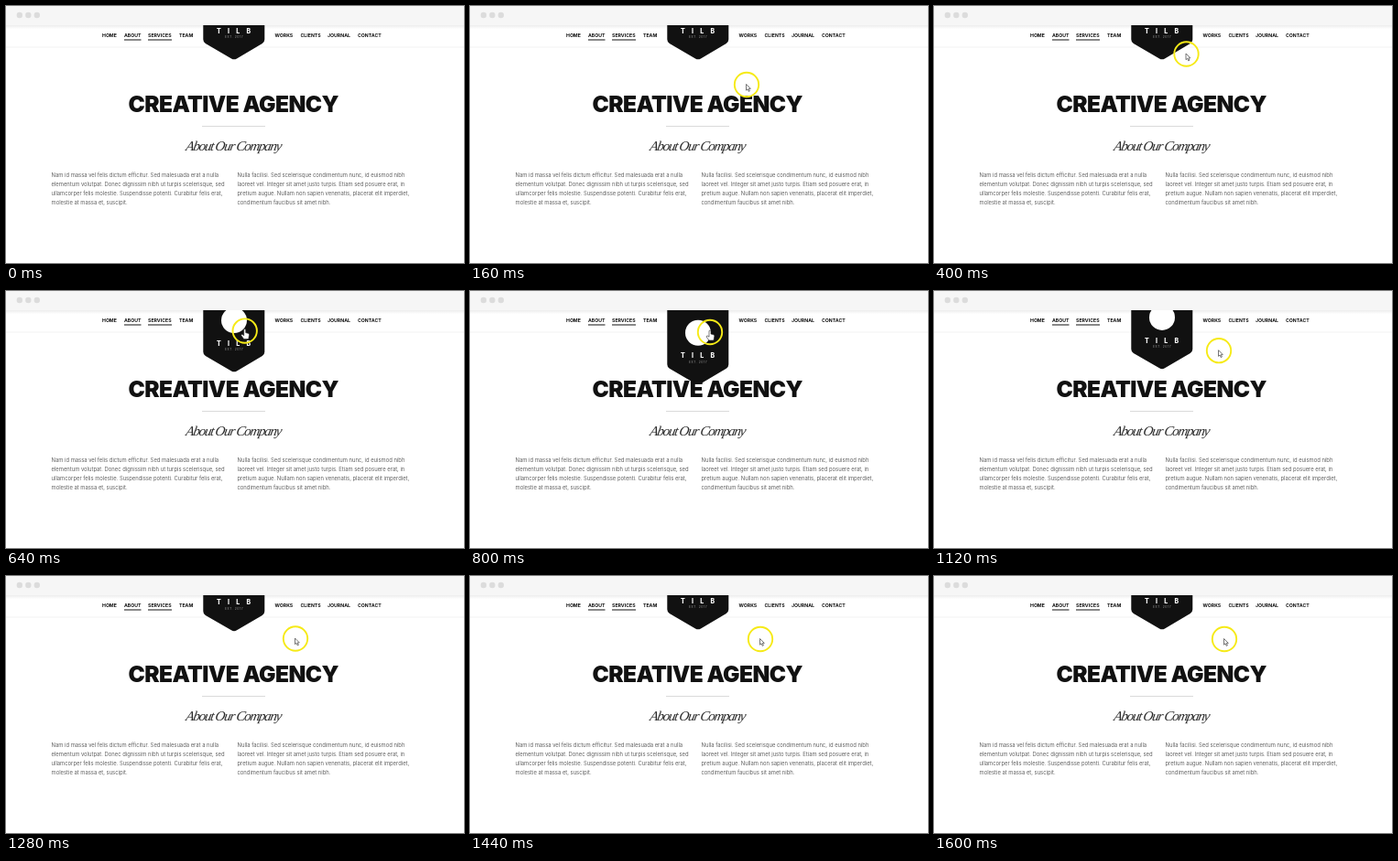
An HTML page for the animation above (1680 ms loop, 500 by 281 pixels).

```html
<!DOCTYPE html>
<html lang="en">
<head>
<meta charset="utf-8">
<title>Creative agency</title>
<style>
  html, body { margin: 0; height: 100%; overflow: hidden; background: #fff; }
  svg { display: block; width: 100vw; height: 100vh; }
  .nav { font: 700 5.2px Inter, sans-serif; fill: #111; }
  .title { font: 900 24.5px Inter, sans-serif; letter-spacing: -.6px; fill: #111; }
  .script { font: italic 15px "Liberation Serif", serif; letter-spacing: -1.25px; fill: #2a2a2a; }
  .copy { font: 5.86px Inter, sans-serif; fill: #606060; }
  .brand { font: 800 7px Inter, sans-serif; letter-spacing: 7.3px; fill: #fff; }
  .since { font: 3.2px Inter, sans-serif; letter-spacing: .6px; fill: #999; }
</style>
</head>
<body>
<svg viewBox="0 0 500 281">
  <defs>
    <linearGradient id="shade" x2="0" y2="1">
      <stop stop-color="#ededed"/><stop offset="1" stop-color="#fff"/>
    </linearGradient>
  </defs>
  <rect y="21" width="500" height="4" fill="url(#shade)"/>
  <path d="M0 45H500" stroke="#f3f3f3"/>
  <g id="nav" class="nav"></g>
  <path d="M129 37H147.5M155 37H181" stroke="#111"/>

  <text class="title" x="248.2" y="116.2" text-anchor="middle">CREATIVE AGENCY</text>
  <path d="M214 131.5H283" stroke="#dadada"/>
  <text class="script" text-anchor="middle" transform="translate(247.6 158) skewX(-10)">About Our Company</text>
  <g id="copy" class="copy"></g>

  <g id="banner">
    <path d="M215.3-60H282.3V36.5Q282.3 39.5 279.8 41L252 57.4Q249 59.2 246 57.4L217.8 41Q215.3 39.5 215.3 36.5Z" fill="#111"/>
    <circle cx="249" cy="2" r="14" fill="#fff"/>
    <text class="brand" x="230" y="29.6">TILB</text>
    <text class="since" x="239" y="35.2">EST. 2017</text>
  </g>

  <rect width="500" height="21" fill="#f6f6f6"/>
  <g fill="#dcdcdc">
    <circle cx="14.8" cy="10" r="3.2"/><circle cx="24.3" cy="10" r="3.2"/><circle cx="33.8" cy="10" r="3.2"/>
  </g>

  <g id="cursor">
    <circle r="13.2" fill="none" stroke="#f6ea17" stroke-width="1.9"/>
    <path id="arrow" d="M-.5-.5V6.2L1.1 4.8 2.2 7.4 3.4 6.9 2.3 4.4H4.3Z" fill="#fff" stroke="#555" stroke-width=".8"/>
    <path id="hand" d="M-1-1.5Q0-2.5 1-1.5V2L4 2.8Q5 3.2 4.8 4.5L4 9H-1L-4 5Q-3.6 3.5-2.3 4.2L-1 5.2Z" fill="#fff" stroke="#222" stroke-width=".6"/>
  </g>
</svg>
<script>
const LOOP = 1680, STEP = 80, DROP = 44, SLIDE = 320;
const OPEN_AT = 512, CLOSE_AT = 1043;
const el = id => document.getElementById(id);

const label = (x, y, text) => `<text x="${x}" y="${y}">${text}</text>`;

el('nav').innerHTML = [
  [105, 'HOME'], [129, 'ABOUT'], [155, 'SERVICES'], [189, 'TEAM'],
  [293.5, 'WORKS'], [321.5, 'CLIENTS'], [351, 'JOURNAL'], [384, 'CONTACT']
].map(([x, text]) => label(x, 33.6, text)).join('');

const column = (x, lines) => lines.map((line, i) => label(x, 186.6 + i * 10.1, line)).join('');

el('copy').innerHTML = column(49.5, [
  'Nam id massa vel felis dictum efficitur. Sed malesuada erat a nulla',
  'elementum volutpat. Donec dignissim nibh ut turpis scelerisque, sed',
  'ullamcorper felis molestie. Suspendisse potenti. Curabitur felis erat,',
  'molestie at massa et, suscipit.'
]) + column(252.5, [
  'Nulla facilisi. Sed scelerisque condimentum nunc, id euismod nibh',
  'laoreet vel. Integer sit amet justo turpis. Etiam sed posuere erat, in',
  'pretium augue. Nullam non sapien venenatis, placerat elit imperdiet,',
  'condimentum faucibus sit amet nibh.'
]);

// Pointer path: time, x, y
const path = [
  [80, 325, 143], [160, 302, 86], [240, 302, 86], [320, 288, 66], [400, 275.5, 52.5],
  [480, 268, 48], [640, 260.7, 43.6], [800, 262, 45], [880, 267, 48], [960, 276.3, 52.5],
  [1040, 297, 61], [1120, 311, 65.2], [1200, 315, 68], [1360, 317, 69], [LOOP, 317, 69]
];

function pointerAt(t) {
  const i = Math.max(1, path.findIndex(key => key[0] > t));
  const [t0, x0, y0] = path[i - 1], [t1, x1, y1] = path[i];
  const k = (t - t0) / (t1 - t0);
  return [x0 + (x1 - x0) * k, y0 + (y1 - y0) * k];
}

// Same curve as the CSS "ease" keyword
function ease(p) {
  if (p <= 0 || p >= 1) return p <= 0 ? 0 : 1;
  const bezier = (s, a, b) => 3 * s * (1 - s) ** 2 * a + 3 * s * s * (1 - s) * b + s ** 3;
  let low = 0, high = 1;
  for (let i = 0; i < 20; i++) {
    const mid = (low + high) / 2;
    if (bezier(mid, .25, .25) < p) low = mid; else high = mid;
  }
  return bezier(low, .1, 1);
}

function draw(now) {
  const t = Math.floor(now % LOOP / STEP) * STEP;
  const drop = DROP * (ease((t - OPEN_AT) / SLIDE) - ease((t - CLOSE_AT) / SLIDE));
  el('banner').setAttribute('transform', `translate(0 ${drop})`);

  const hovering = t >= OPEN_AT && t < 1040;
  el('cursor').setAttribute('visibility', t < 80 ? 'hidden' : 'visible');
  el('cursor').setAttribute('transform', `translate(${pointerAt(t)})`);
  el('arrow').setAttribute('display', hovering ? 'none' : 'inline');
  el('hand').setAttribute('display', hovering ? 'inline' : 'none');
  requestAnimationFrame(draw);
}
requestAnimationFrame(draw);
</script>
</body>
</html>
```
